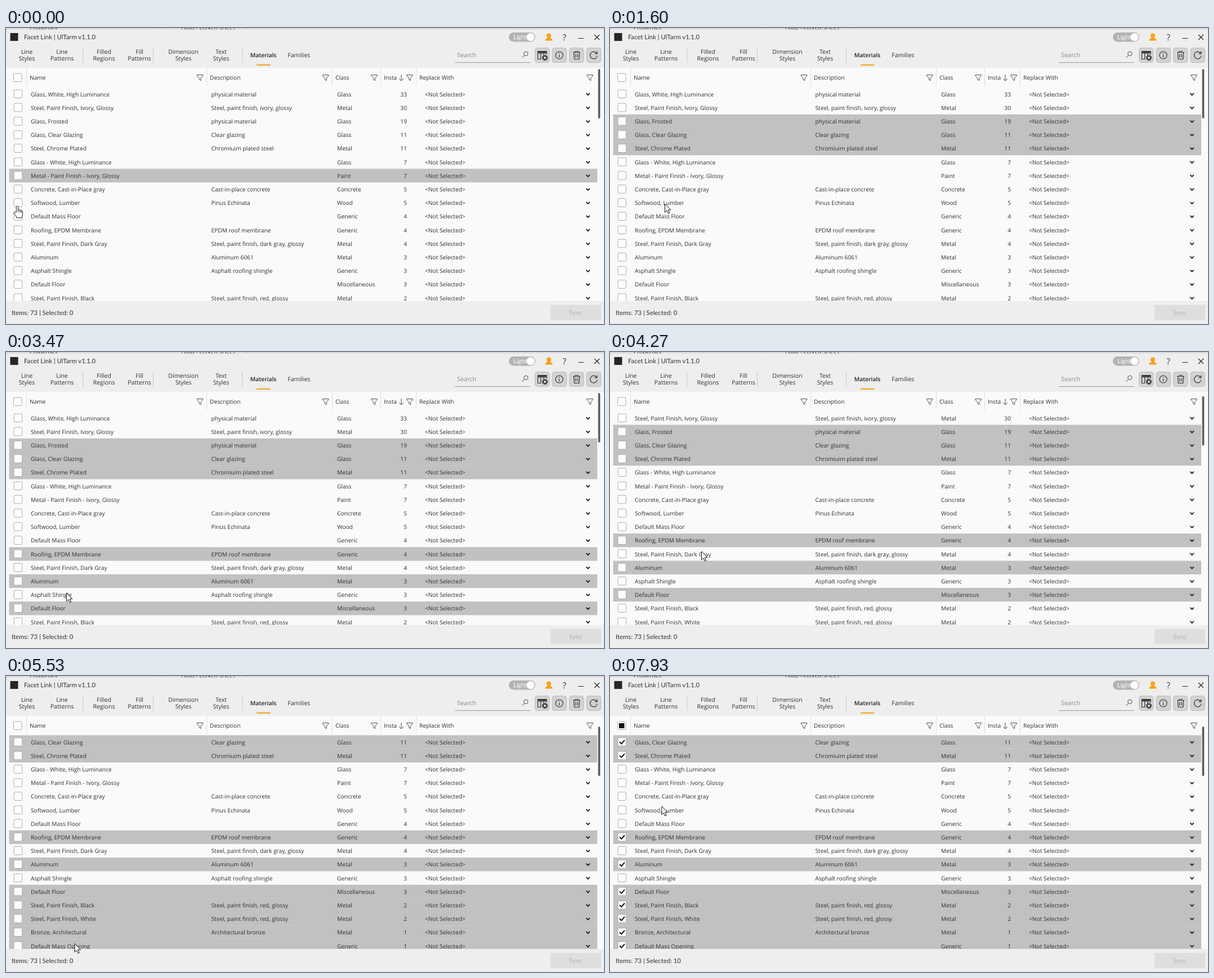
An HTML page for the animation above (8000 ms loop, 1062 by 527 pixels).

```html
<!DOCTYPE html>
<html lang="en">
<head>
<meta charset="utf-8">
<title>Material list</title>
<style>
  html, body { margin: 0; width: 100%; height: 100%; overflow: hidden; background: #eee; }
  svg { display: block; width: 1062px; height: 527px; }
  text { font: 10.2px "Open Sans", "Noto Sans", sans-serif; fill: #303030; text-rendering: geometricPrecision; white-space: pre; }
  .tab { font-size: 10.6px; text-anchor: middle; }
  .on { font-size: 10.3px; font-weight: 600; fill: #222; }
  .lato { font: 11.3px Lato, "Open Sans", sans-serif; }
  .num { text-anchor: end; }
  .line { fill: none; stroke: #4a4a4a; stroke-width: 1; }
  .box { fill: #fdfdfd; stroke: #acacac; stroke-width: 1; }
  .tick { fill: none; stroke: #111; stroke-width: 2; }
  .chev { fill: none; stroke: #222; stroke-width: 1.9; }
  .btn { fill: #d2d2d2; stroke: #bdbdbd; }
  .rule { stroke: #dedede; }
  .cursor { fill: #fff; stroke: #111; stroke-width: 1; stroke-linejoin: round; }
</style>
</head>
<body>
<svg id="stage" viewBox="0 0 1062 527" xmlns="http://www.w3.org/2000/svg">
  <rect width="1062" height="527" fill="#fafafa"/>
  <g id="rows"></g>

  <!-- column headings -->
  <rect y="71" width="1062" height="34.3" fill="#fafafa"/>
  <g id="head"></g>
  <rect class="box" x="13.5" y="81" width="14.5" height="14.5" rx="2"/>
  <rect id="partial" x="16" y="84" width="9.5" height="9" fill="#111"/>
  <path class="line" d="M702 83V94M698 90L702 94L706 90"/>
  <rect id="thumb" x="1051.6" y="73" width="3.6" height="88" rx="1.8" fill="#5c5c5c"/>

  <!-- title bar and toolbar -->
  <rect width="1062" height="71" fill="#eee"/>
  <svg width="1062" height="2.4">
    <rect width="1062" height="3" fill="#dcdcdc"/>
    <text x="42" y="2.5">Properties</text>
    <text x="272" y="2">×</text>
    <text x="311" y="2.5">Food - COVER SHEET</text>
    <text x="424" y="2">×</text>
  </svg>
  <rect x="7.5" y="9" width="14" height="14" fill="#262626"/>
  <text class="lato" x="32" y="20">Facet Link | UlTarm v1.1.0</text>
  <rect x="893" y="8" width="47" height="16.5" rx="8.2" fill="#b3b3b3"/>
  <text class="lato" x="901" y="20" style="fill:#fff;font-size:11px">Light</text>
  <circle cx="931.5" cy="16.2" r="7" fill="#fff"/>
  <path d="M960 13.5a4 4 0 0 1 8 0c0 2-1 3.5-2 4.3 2.500 .7 4.500 1.700 4.500 3.700V22.500H957.500V21.500c0-2 2-3 4.500-3.700-1-.8-2-2.300-2-4.300Z" fill="#f5a31a"/>
  <text x="988.5" y="21.500" style="font-size:15px">?</text>
  <path class="line" style="stroke:#222;stroke-width:1.2" d="M1016.500 18.500H1026M1045 12L1054 21M1054 12L1045 21"/>
  <g id="tabs"></g>
  <path class="rule" style="stroke:#c9c9c9" d="M136.500 36V62M261.500 36V62M419.500 36V62"/>
  <rect x="445" y="64.500" width="24.500" height="2.600" fill="#f0b13c"/>
  <text x="801" y="52.300" style="font-size:10.900px;fill:#888">Search</text>
  <path class="line" style="stroke:#999" d="M797 61.500H931"/>
  <path class="line" d="M920.500 48.500L916.500 53"/>
  <circle class="line" cx="923.300" cy="45.800" r="3.700"/>
  <g id="buttons"></g>
  <g class="line" style="stroke:#333;stroke-width:1.200">
    <path d="M950 55.500H944.500V41.500H960V47M944.500 45H960M949.700 41.500V55.500M954.900 41.500V48"/>
    <path d="M944.500 42.800H960" stroke-width="2.500"/>
    <circle cx="957" cy="53" r="3.200" stroke-width="2"/>
    <circle cx="957" cy="53" r="4.800" stroke-dasharray="1.900 1.870"/>
    <circle cx="982.500" cy="48.500" r="6.500"/>
    <path d="M982.500 47.500V52.200M982.500 44.600V46"/>
    <path d="M1007 43.500H1020M1011 43.300V41.500H1016V43.300M1008.500 43.500L1009.300 55.500H1017.700L1018.500 43.500M1011.800 46.500V52.500M1015.200 46.500V52.500"/>
    <path d="M1049.300 45.500A6.300 6.300 0 1 0 1050 49.500M1049.800 41.500V45.700H1045.500"/>
  </g>

  <!-- status bar -->
  <rect y="486" width="1062" height="41" fill="#eee"/>
  <text class="lato" id="status" x="10" y="510.500"></text>
  <rect x="967" y="493" width="90" height="27" rx="2" fill="#dedede"/>
  <text class="lato" x="1000" y="510.500" style="fill:#b4b4b4;font-size:11.700px">Sync</text>

  <path id="arrow" class="cursor" d="M.5 .5V15.500L4 12.300L6.400 17.600L8.700 16.600L6.400 11.400H11Z"/>
  <g id="hand" class="cursor">
    <path d="M-1.700 11V1.700C-1.700-.3 1.700-.3 1.700 1.700V7C2.200 5.800 4.600 6 4.800 7.500C5.500 6.600 7.300 7 7.400 8.400C8.300 7.600 9.500 8.300 9.500 9.500V14.500C9.500 16.500 8.200 17.500 8 21H-1C-1.300 18.500-4 16-5.800 12.700C-6.700 11-4.600 9.700-3.200 11.200Z"/>
    <path d="M1.700 7V11M4.800 7.500V11.500M7.400 8.400V12"/>
  </g>
</svg>
<script>
const LOOP = 8000, STEP = 1000 / 15, PITCH = 24.2, TOP = 105.4;
const $ = id => document.getElementById(id);

function add(parent, tag, attrs, label) {
  const el = document.createElementNS("http://www.w3.org/2000/svg", tag);
  for (const key in attrs) el.setAttribute(key, attrs[key]);
  if (label !== undefined) el.textContent = label;
  parent.append(el);
  return el;
}
const label = (parent, x, y, str, cls = "") => add(parent, "text", { x, y, class: cls }, str);

// name | description | class | instances | step at which the row is selected
const materials = `Glass, White, High Luminance|physical material|Glass|33
Steel, Paint Finish, Ivory, Glossy|Steel, paint finish, ivory, glossy|Metal|30
Glass, Frosted|physical material|Glass|19|14
Glass, Clear Glazing|Clear glazing|Glass|11|20
Steel, Chrome Plated|Chromiuim plated steel|Metal|11|20
Glass - White, High Luminance||Glass|7
Metal - Paint Finish - Ivory, Glossy||Paint|7
Concrete, Cast-in-Place gray|Cast-in-place concrete|Concrete|5
Softwood, Lumber|Pinus Echinata|Wood|5
Default Mass Floor||Generic|4
Roofing, EPDM Membrane|EPDM roof membrane|Generic|4|35
Steel, Paint Finish, Dark Gray|Steel, paint finish, dark gray, glossy|Metal|4
Aluminum|Aluminum 6061|Metal|3|41
Asphalt Shingle|Asphalt roofing shingle|Generic|3
Default Floor||Miscellaneous|3|48
Steel, Paint Finish, Black|Steel, paint finish, red, glossy|Metal|2|81
Steel, Paint Finish, White|Steel, paint finish, red, glossy|Metal|2|81
Bronze, Architectural|Architectural bronze|Metal|1|81
Default Mass Opening||Generic|1|81`.split("\n").map(line => line.split("|"));

const FIRST_PICK = 6, FIRST_CLICK = 14, CHECK = 100;
const SCROLLS = [64, 65, 67];

const rows = materials.map(([name, note, kind, count, pick], i) => {
  const g = add($("rows"), "g", { transform: `translate(0 ${TOP + i * PITCH})` });
  const fill = add(g, "rect", { x: 5.5, width: 1044.5, height: PITCH + .1, fill: "#c1c1c1" });
  add(g, "rect", { class: "box", x: 14, y: 4.6, width: 14.7, height: 14.7, rx: 2 });
  const tick = add(g, "path", { class: "tick", d: "M17 12L20.3 15.3L26 8.7" });
  label(g, 44, 16.2, name);
  label(g, 364.5, 16.2, note);
  label(g, 588, 16.2, kind);
  label(g, 712, 16.2, count, "num");
  label(g, 744, 16.2, "<Not Selected>");
  add(g, "path", { class: "chev", d: "M1030.4 10.8L1033.6 14L1036.8 10.8" });
  return { fill, tick, pick: pick ? +pick : Infinity };
});

[["Name", 42, 344.5], ["Description", 362, 567.7], ["Class", 585, 654], ["Insta", 671, 717], ["Replace With", 734, 1037]]
  .forEach(([str, x, icon]) => {
    label($("head"), x, 92.3, str);
    add($("head"), "path", { class: "line", transform: `translate(${icon} 88.5)`,
      d: "M-5.3-5H5.3V-3.6L1.5 .7V5L-1.5 3.3V.7L-5.3-3.6Z" });
    add($("head"), "path", { class: "rule", d: `M${x - 5.5} 71V103` });
  });

[["Line", "Styles", 37], ["Line", "Patterns", 99.5], ["Filled", "Regions", 174], ["Fill", "Patterns", 237],
 ["Dimension", "Styles", 315], ["Text", "Styles", 382]].forEach(([a, b, x]) => {
  label($("tabs"), x, 45.8, a, "tab");
  label($("tabs"), x, 58.2, b, "tab");
});
label($("tabs"), 457, 52.2, "Materials", "tab on");
label($("tabs"), 520.3, 52.2, "Families", "tab");

[939.5, 970, 1000.5, 1031].forEach(x =>
  add($("buttons"), "rect", { class: "btn", x, y: 35.5, width: 25.5, height: 26, rx: 4 }));

// pointer path: step, x, y
const path = [
  [0, 20, 317], [8, 64, 148], [10, 65, 157], [13, 65, 157], [15, 77, 203], [16, 77, 210], [19, 77, 210],
  [26, 102, 338], [27, 102, 338], [30, 109, 357], [34, 109, 357], [35, 113.5, 373], [38, 113, 400],
  [40, 113, 400], [43, 107, 451], [47, 107, 451], [50, 105, 431], [51, 105, 431], [60, 161.5, 355],
  [68, 162.5, 354], [79, 121.5, 476], [86, 121.5, 476], [98, 20, 376], [100, 20, 376],
  [112, 103, 269], [113, 103, 269], [115, 87, 247.5], [117, 87, 247.5], [119, 91.3, 231.5]
];

function pointer(k) {
  let i = path.findIndex(p => p[0] >= k);
  if (i < 0) i = path.length - 1;
  const b = path[i], a = path[Math.max(0, i - 1)];
  const u = b[0] > a[0] ? Math.min(1, (k - a[0]) / (b[0] - a[0])) : 1;
  const e = u * u * (3 - 2 * u);
  return [a[1] + (b[1] - a[1]) * e, a[2] + (b[2] - a[2]) * e];
}

const show = (el, on) => el.setAttribute("visibility", on ? "visible" : "hidden");

function draw(k) {
  const checked = k >= CHECK;
  const scroll = SCROLLS.filter(s => k >= s).length;
  rows.forEach(({ fill, tick, pick }, i) => {
    const on = k >= pick || (i === FIRST_PICK && k < FIRST_CLICK);
    show(fill, on);
    show(tick, on && checked);
  });
  show($("partial"), checked);
  $("rows").setAttribute("transform", `translate(0 ${-scroll * PITCH})`);
  $("thumb").setAttribute("y", 73 + scroll * 5.7);
  $("status").textContent = `Items: 73 | Selected: ${checked ? 10 : 0}`;

  const [x, y] = pointer(k), overBox = x < 30;
  const at = `translate(${x.toFixed(1)} ${y.toFixed(1)})`;
  $("arrow").setAttribute("transform", at);
  $("hand").setAttribute("transform", at);
  show($("arrow"), !overBox);
  show($("hand"), overBox);
}

const start = performance.now();
let last = -1;
function tick() {
  const t = Math.max(0, performance.now() - start) % LOOP;
  const k = Math.floor((t + 3.5) / STEP) % 120;
  if (k !== last) draw(last = k);
  requestAnimationFrame(tick);
}
tick();
</script>
</body>
</html>
```
